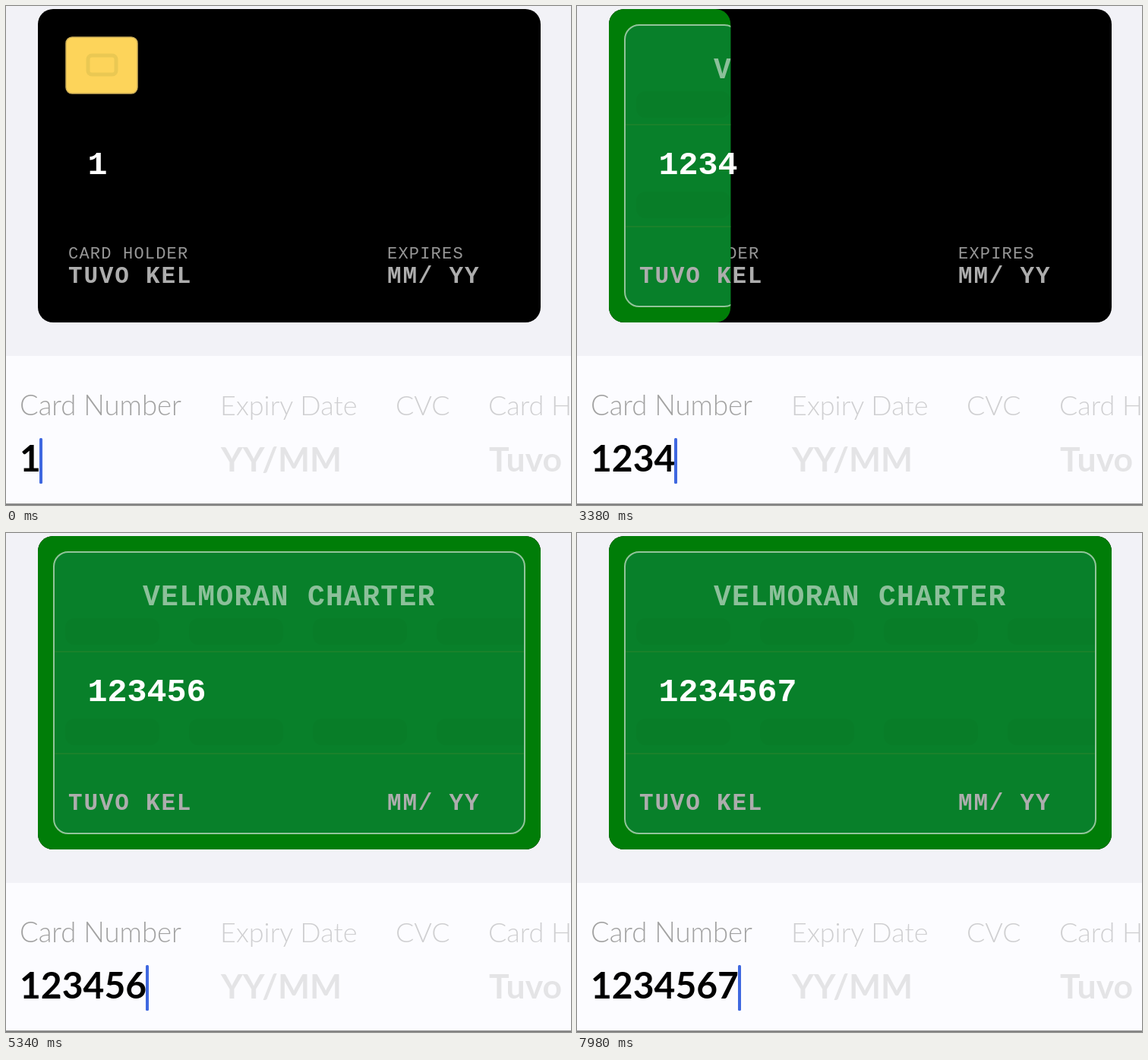
Recreate the animation shown at these times as an HTML page. Size 744x656 px, loop 8 s.

```html
<!DOCTYPE html>
<html lang="en">
<head>
<meta charset="utf-8">
<title>Card form</title>
<style>
@property --typed { syntax: "<number>"; inherits: true; initial-value: 1; }
@property --wipe { syntax: "<number>"; inherits: true; initial-value: 0; }

html, body { margin: 0; width: 100%; height: 100%; overflow: hidden; background: #f2f2f7; }

#stage {
  display: block;
  width: 744px;
  height: 656px;
  white-space: pre;
  animation: type 8s step-end infinite, wipe 8s ease-in-out infinite;
}

@keyframes type {
  0% { --typed: 1; }
  5.25% { --typed: 2; }
  20.75% { --typed: 3; }
  35.75% { --typed: 4; }
  52.5% { --typed: 5; }
  66.75% { --typed: 6; }
  88.5%, 100% { --typed: 7; }
}

@keyframes wipe {
  0%, 35.875% { --wipe: 0; }
  54.625%, 100% { --wipe: 1; }
}

@keyframes idle {
  0%, 83.75% { opacity: 1; }
  88.49% { opacity: .6; }
  88.5%, 100% { opacity: 1; }
}

.reveal { width: calc(var(--wipe) * 662px); }
.frame { width: calc(var(--wipe) * 620px); fill: none; stroke: #92c49a; stroke-width: 2; }
.rule { stroke: #20822c; stroke-width: 1.5; }

.mono { font-family: "Liberation Mono", monospace; }
.caption { font-size: 22px; letter-spacing: 1.2px; fill: #969696; }
.detail { font-size: 31px; font-weight: 700; letter-spacing: 1.8px; fill: #adadad; }
.brand { font-size: 38px; font-weight: 700; letter-spacing: 1.3px; fill: #8cc09a; }
.number { font-size: 43.3px; font-weight: 700; fill: #fff; }

.form { font-family: Lato, sans-serif; }
.label { font-size: 36px; font-weight: 300; fill: #cfcfd1; }
.label.active { font-size: 36.5px; fill: #a2a2a2; }
.hint { font-size: 44.5px; font-weight: 700; fill: #e4e4e6; }
.entry { font-size: 48px; font-weight: 700; fill: #000; }

.digits tspan { fill-opacity: clamp(0, var(--typed) - var(--i), 1); }
.caret {
  fill: #3f68e0;
  transform: translateX(calc(var(--typed) * 28px));
  animation: idle 8s linear infinite;
}
</style>
</head>
<body>
<svg id="stage" viewBox="0 0 744 656">
  <defs>
    <clipPath id="revealed"><rect class="reveal" x="42" y="4" height="412" rx="20"/></clipPath>
    <clipPath id="inside"><rect class="frame" x="63" y="25" height="370" rx="19"/></clipPath>
    <pattern id="guilloche" x="78" y="110" width="163" height="132" patternUnits="userSpaceOnUse">
      <rect y="2" width="124" height="35" rx="12" fill="#003800" opacity=".04"/>
    </pattern>
  </defs>

  <rect width="744" height="656" fill="#f2f2f7"/>

  <rect x="42" y="4" width="662" height="412" rx="20"/>
  <rect x="79" y="41" width="94" height="74" rx="8" fill="#fdd45a" stroke="#cfb058" stroke-width="1.5"/>
  <rect x="108" y="65" width="37" height="25" rx="5" fill="none" stroke="#e4c450" stroke-width="5" opacity=".75"/>
  <g class="mono caption">
    <text x="82" y="332">CARD HOLDER</text>
    <text x="502" y="332">EXPIRES</text>
  </g>

  <g clip-path="url(#revealed)">
    <rect x="42" y="4" width="662" height="412" fill="#007d08"/>
    <g clip-path="url(#inside)">
      <rect x="62" y="24" width="622" height="372" fill="#08802a"/>
      <rect x="64" y="100" width="618" height="200" fill="url(#guilloche)"/>
      <path class="rule" d="M64 156H682M64 290H682"/>
    </g>
    <rect class="frame" x="63" y="25" height="370" rx="19"/>
    <text class="mono brand" x="180" y="95">VELMORAN CHARTER</text>
  </g>

  <g class="mono">
    <text class="number digits" x="107.5" y="221"></text>
    <text class="detail" x="82" y="364">TUVO KEL</text>
    <text class="detail" x="502" y="364">MM/ YY</text>
  </g>

  <rect y="460" width="744" height="196" fill="#fcfcff"/>
  <rect y="654" width="744" height="2" fill="#868686"/>
  <g class="form">
    <text class="label active" x="18" y="538">Card Number</text>
    <text class="label" x="282" y="538">Expiry Date</text>
    <text class="label" x="513" y="538">CVC</text>
    <text class="label" x="635" y="538">Card Holder</text>
    <text class="hint" x="283" y="612">YY/MM</text>
    <text class="hint" x="636" y="612">Tuvo</text>
    <text class="entry digits" x="18" y="612"></text>
  </g>
  <rect class="caret" x="16" y="568" width="4" height="60" rx="1.5"/>
</svg>
<script>
const SVG_NS = "http://www.w3.org/2000/svg";

for (const line of document.querySelectorAll(".digits")) {
  [..."1234567"].forEach((digit, i) => {
    const span = document.createElementNS(SVG_NS, "tspan");
    span.textContent = digit;
    span.style.setProperty("--i", i);
    line.append(span);
  });
}
</script>
</body>
</html>
```
